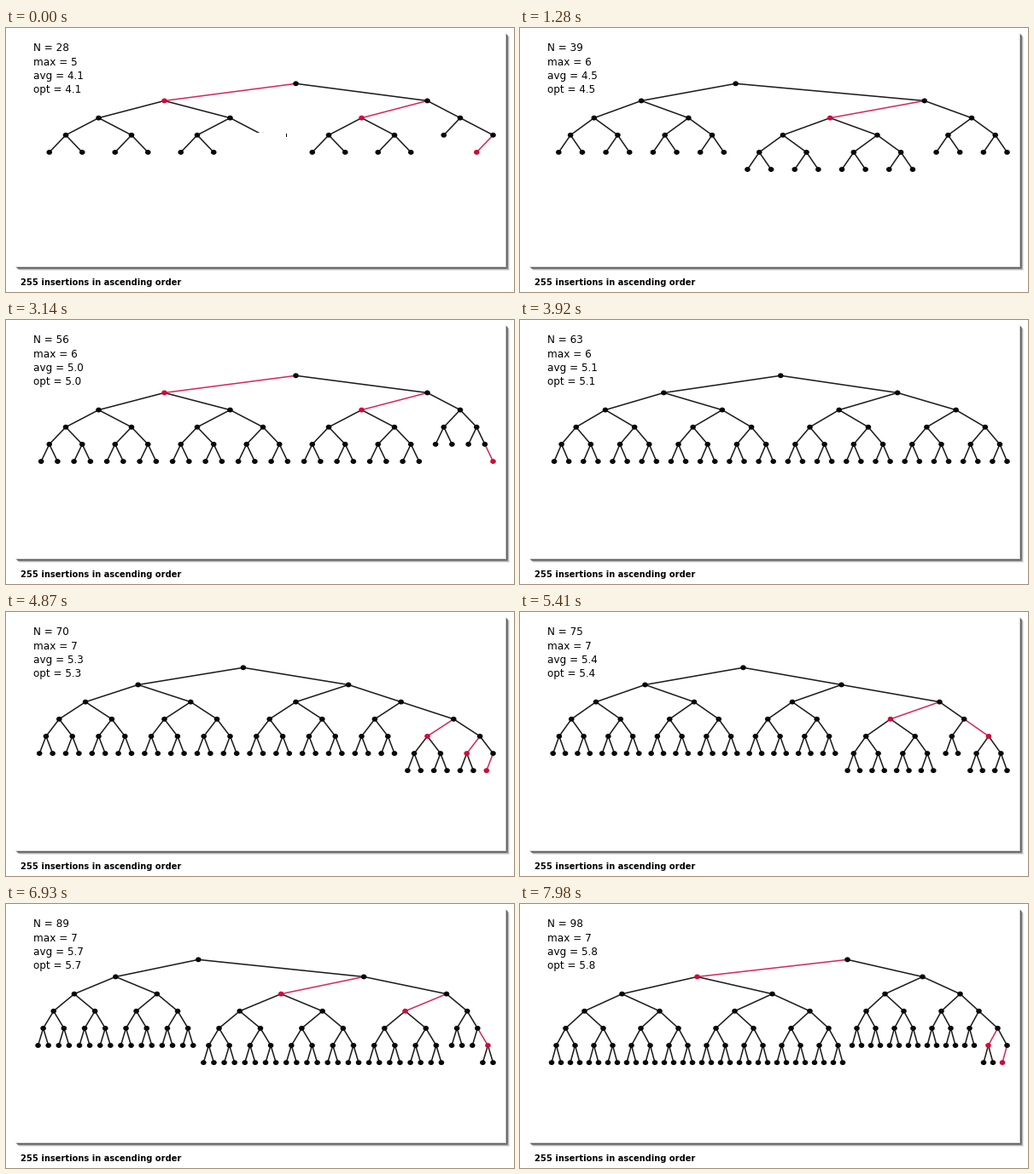
A matplotlib script that plays this animation: 595 px wide and 310 px high, repeating every 8000 ms.

```python
import matplotlib.pyplot as plt
import numpy as np
from matplotlib.animation import FuncAnimation
from matplotlib.collections import LineCollection
from matplotlib.markers import MarkerStyle
from matplotlib.patches import Rectangle
from matplotlib.transforms import Affine2D

W, H, DPI = 595, 310, 100
STEP, LOOP = 20, 8000
FIRST, LAST = 28, 98
PT = 72 / DPI
BLACK, RED = "#080808", "#cf0a3c"
LINE, RED_LINE = "#1c1c1c", "#d42a5c"

# (time in ms, position in the list of tree states)
PACE = [(0, 0), (99, 0.9), (100, 1), (1280, 33.3), (2360, 59.3), (3900, 104),
        (4199, 104.9), (4200, 105), (4860, 122.4), (5980, 153.3),
        (7980, 206.3), (8000, 206.9)]


class Tree:
    """Left-leaning red-black tree fed with 1, 2, 3, ..."""

    def __init__(self):
        self.left, self.right, self.red = {}, {}, set()
        self.root, self.size = None, 0

    def spine(self):
        path, node = [], self.root
        while node:
            path.append(node)
            node = self.right.get(node)
        return path

    def rotate(self, node, parent):
        top = self.right[node]
        self.right[node] = self.left.get(top)
        self.left[top] = node
        if node not in self.red:
            self.red.discard(top)
        self.red.add(node)
        if parent:
            self.right[parent] = top
        else:
            self.root = top

    def flip(self, node):
        self.red -= {self.left[node], self.right[node]}
        if node != self.root:
            self.red.add(node)

    def insert(self):
        """Add the next key and yield a snapshot after every operation."""
        path = self.spine()
        self.size += 1
        if path:
            self.right[path[-1]] = self.size
            self.red.add(self.size)
        else:
            self.root = self.size
        yield self.snapshot()
        for i in range(len(path) - 1, -1, -1):
            node = path[i]
            if self.right.get(node) not in self.red:
                continue
            if self.left.get(node) in self.red:
                self.flip(node)
            else:
                self.rotate(node, path[i - 1] if i else None)
            yield self.snapshot()

    def snapshot(self):
        depth = np.zeros(self.size, int)
        links, stack = [], [(self.root, 0)]
        while stack:
            node, level = stack.pop()
            depth[node - 1] = level
            for child in (self.left.get(node), self.right.get(node)):
                if child:
                    links.append((node, child))
                    stack.append((child, level + 1))
        return depth, links, frozenset(self.red)


def build_states():
    tree, states = Tree(), []
    for n in range(1, LAST + 1):
        steps = list(tree.insert())
        if n == FIRST:
            states.append(steps[-1])
        elif n > FIRST:
            states += steps
    return states


states = build_states()
pace_t, pace_i = zip(*PACE)

fig = plt.figure(figsize=(W / DPI, H / DPI), dpi=DPI, facecolor="white")
ax = fig.add_axes([0, 0, 1, 1])
ax.set_xlim(0, W)
ax.set_ylim(H, 0)
ax.axis("off")

# drop shadow along the right and bottom edges of the panel
for i, grey in enumerate((0.78, 0.36, 0.5, 0.72, 0.9)):
    x, y = 584.5 + i, 279.5 + i
    ax.plot([x, x, 11 + i], [6 + i, y, y], color=str(grey), lw=PT,
            solid_capstyle="butt", solid_joinstyle="miter")


def label(x, y, text, size, **kw):
    return ax.text(x, y, text, fontsize=size * PT, family="DejaVu Sans",
                   color="black", va="baseline", **kw)


label(16.8, 301.5, "255 insertions in ascending order", 9.87, weight="bold")
stats = [label(32, y, "", 12) for y in (27, 43.5, 60, 75.7)]

edges = LineCollection([], linewidths=1.55 * PT, zorder=2)
ax.add_collection(edges)
oval = MarkerStyle("o", transform=Affine2D().scale(1.1, 0.98))
dots = ax.scatter([], [], s=(6 * PT) ** 2, marker=oval, linewidths=0, zorder=3)

# blank area shown during the opening hold
gap = [Rectangle((270, 123.4), 57.5, 30, fc="white", lw=0, zorder=4),
       Rectangle((327.5, 123.5), 1.5, 4, fc=BLACK, lw=0, zorder=4)]
for patch in gap:
    ax.add_patch(patch)


def draw(frame):
    t = frame * STEP
    index = min(int(np.interp(t, pace_t, pace_i)), len(states) - 1)
    depth, links, red = states[index]
    n = len(depth)
    keys = np.arange(1, n + 1)
    pos = np.column_stack([31.5 + 539 * keys / n, 65.3 + 20.15 * depth])

    edges.set_segments([pos[[a - 1, b - 1]] for a, b in links])
    edges.set_color([RED_LINE if b in red else LINE for _, b in links])
    dots.set_offsets(pos)
    dots.set_facecolor([RED if k in red else BLACK for k in keys])

    best = sum(int(k).bit_length() for k in keys) / n
    values = (f"N = {n}", f"max = {depth.max() + 1}",
              f"avg = {depth.mean() + 1:.1f}", f"opt = {best:.1f}")
    for item, value in zip(stats, values):
        item.set_text(value)
    for patch in gap:
        patch.set_visible(t < 100)
    return [edges, dots, *stats, *gap]


anim = FuncAnimation(fig, draw, frames=LOOP // STEP, interval=STEP,
                     init_func=lambda: draw(0), repeat=True, repeat_delay=0,
                     blit=False)
plt.show()
```
